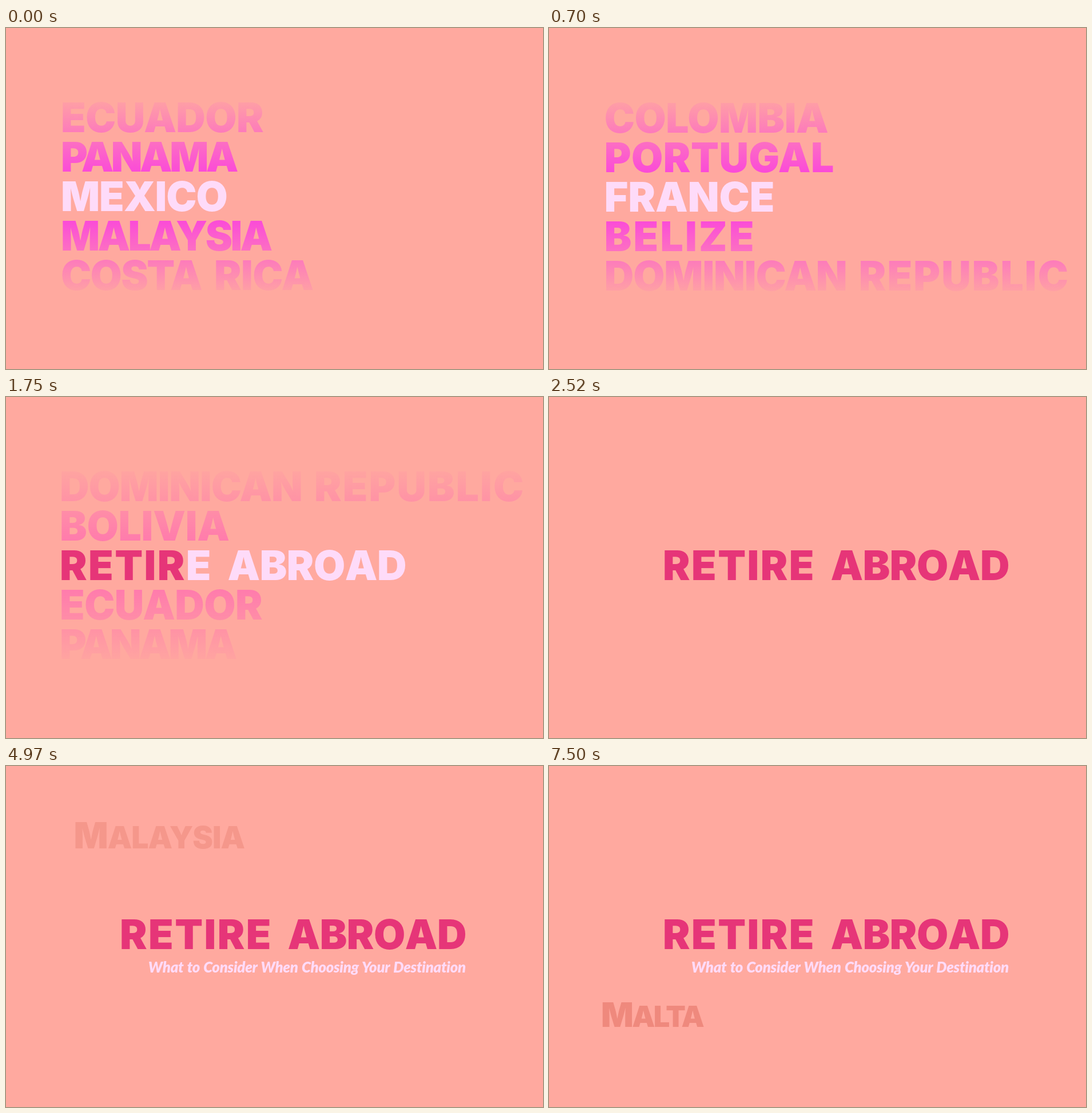
Animation of 939 by 596 pixels, one loop 8000 ms. Source, as an HTML page:

```html
<!DOCTYPE html>
<html lang="en">
<head>
<meta charset="utf-8">
<title>Retire Abroad</title>
<style>
  html, body { margin: 0; width: 100%; height: 100%; overflow: hidden; background: #ffa99f; }
  svg { display: block; width: 100%; height: 100%; }
  text { font: 900 71.3px Inter, "Noto Sans", sans-serif; font-optical-sizing: none; white-space: pre; }
  .head { font-kerning: none; }
  .sub { font: italic 900 25.8px Lato, "Open Sans", sans-serif; letter-spacing: -.3px; word-spacing: 1.2px; text-anchor: end; }
  .label { word-spacing: .1em; }
</style>
</head>
<body>
<svg viewBox="0 0 939 596">
  <defs>
    <linearGradient id="fade" gradientUnits="userSpaceOnUse" x1="0" y1="115" x2="0" y2="473">
      <stop offset="0" stop-color="currentColor" stop-opacity="0"/>
      <stop offset=".433" stop-color="currentColor"/>
      <stop offset=".567" stop-color="currentColor"/>
      <stop offset="1" stop-color="currentColor" stop-opacity="0"/>
    </linearGradient>
  </defs>
  <g id="stage"></g>
</svg>
<script>
const LOOP = 8000, LEFT = 94, BASE = 319.7, PITCH = 69;
const PALE = '#fedbf9', PINK = '#e63578';

// Each line holds words as [text, tracking, x offset].
const lines = [
  [['RETIRE', 2.4, 0], ['ABROAD', -.5, 293.5]],
  [['ECUADOR', -.6, 0]],
  [['PANAMA', -4.6, 0]],
  [['MEXICO', -1.1, 0]],
  [['MALAYSIA', -3.7, 0]],
  [['COSTA', -1.7, 0], ['RICA', -.6, 268]],
  [['SPAIN', -1.3, 0]],
  [['MALTA', -4, 0]],
  [['COLOMBIA', -.5, 0]],
  [['PORTUGAL', .5, 0]],
  [['FRANCE', 0, 0]],
  [['BELIZE', 3.2, 0]],
  [['DOMINICAN', -1.1, 0], ['REPUBLIC', 2.1, 445]],
  [['BOLIVIA', -.2, 0]]
];

// start time, text, x, baseline, size, tracking, colour
const labels = [
  [4200, 'MEXICO', 574, 111.5, 44, 0, '#f5988d'],
  [4970, 'MALAYSIA', 118.5, 143.5, 63, -1, '#f5978b'],
  [5800, 'COSTA RICA', 509, 463, 34, -.3, '#f29085'],
  [6570, 'SPAIN', 740, 169, 60, 0, '#f29085'],
  [7500, 'MALTA', 91, 455.5, 59.5, -2.7, '#ef897d']
];

const stage = document.getElementById('stage');
const clamp = (v, lo, hi) => Math.min(hi, Math.max(lo, v));
const mix = (a, b, k) => `rgb(${a.map((v, i) => Math.round(v + (b[i] - v) * k))})`;

const line = (words, x, y, fill) => words.map(([word, track, dx]) =>
  `<text x="${x + dx}" y="${y}" fill="${fill}" letter-spacing="${track}">${word}</text>`).join('');

function headline(x, typed) {
  let n = 0;
  return lines[0].map(([word, track, dx]) => {
    const letters = [...word].map(c => `<tspan fill="${n++ < typed ? PINK : PALE}">${c}</tspan>`);
    return `<text class="head" x="${x + dx}" y="${BASE}" letter-spacing="${track}">${letters.join('')}</text>`;
  }).join('');
}

function list(t) {
  const step = Math.min(Math.floor(t / 100), 11);
  const centre = step + 3;
  const dim = clamp(Math.floor(t / 100) - 11, 0, 3) / 3;
  const out = clamp(Math.floor((t - 2380) / 70) + 1, 0, 3) / 3;
  const wave = step < 10 ? Math.sin(step * Math.PI / 8) : 0;
  const x = LEFT + (step < 10 ? 2 + 2 * wave : 0);
  const y = BASE + 3 * Math.max(0, wave);

  let rows = '';
  for (const d of [-2, -1, 1, 2])
    rows += line(lines[(centre + d) % lines.length], x, y + d * PITCH, 'url(#fade)');
  document.documentElement.style.color = mix([250, 62, 224], [255, 104, 178], dim);
  const html = out < 1 ? `<g opacity="${(1 - .2 * dim) * (1 - out)}">${rows}</g>` : '';

  if (step < 11) return html + line(lines[centre % lines.length], x, y, PALE);
  const typed = t < 1400 ? 0 : t < 1540 ? 1 : Math.min(12, 2 + Math.floor((t - 1540) / 70));
  const slide = 1 - (1 - out) ** 2;
  return html + headline(LEFT + 105 * slide, typed);
}

function subtitle(t) {
  const k = clamp(Math.floor((t - 3090) / 70), -1, 3);
  if (k < 0) return '';
  const y = 361 + 124 * (1 - k / 3) ** 1.5;
  return `<text class="sub" x="804" y="${y}" fill="${PALE}" opacity="${(k + 1) / 4}">What to Consider When Choosing Your Destination</text>`;
}

function label(t) {
  const current = labels.filter(l => l[0] <= t).pop();
  if (!current) return '';
  const [, text, x, y, size, track, fill] = current;
  const caps = text.split(' ').map(w => `${w[0]}<tspan font-size=".85em">${w.slice(1)}</tspan>`).join(' ');
  return `<text class="label" x="${x}" y="${y}" fill="${fill}" style="font-size:${size}px;letter-spacing:${track}px">${caps}</text>`;
}

let last;
function draw() {
  const t = performance.now() % LOOP;
  const html = label(t) + list(t) + subtitle(t);
  if (html !== last) stage.innerHTML = last = html;
  requestAnimationFrame(draw);
}
draw();
</script>
</body>
</html>
```
